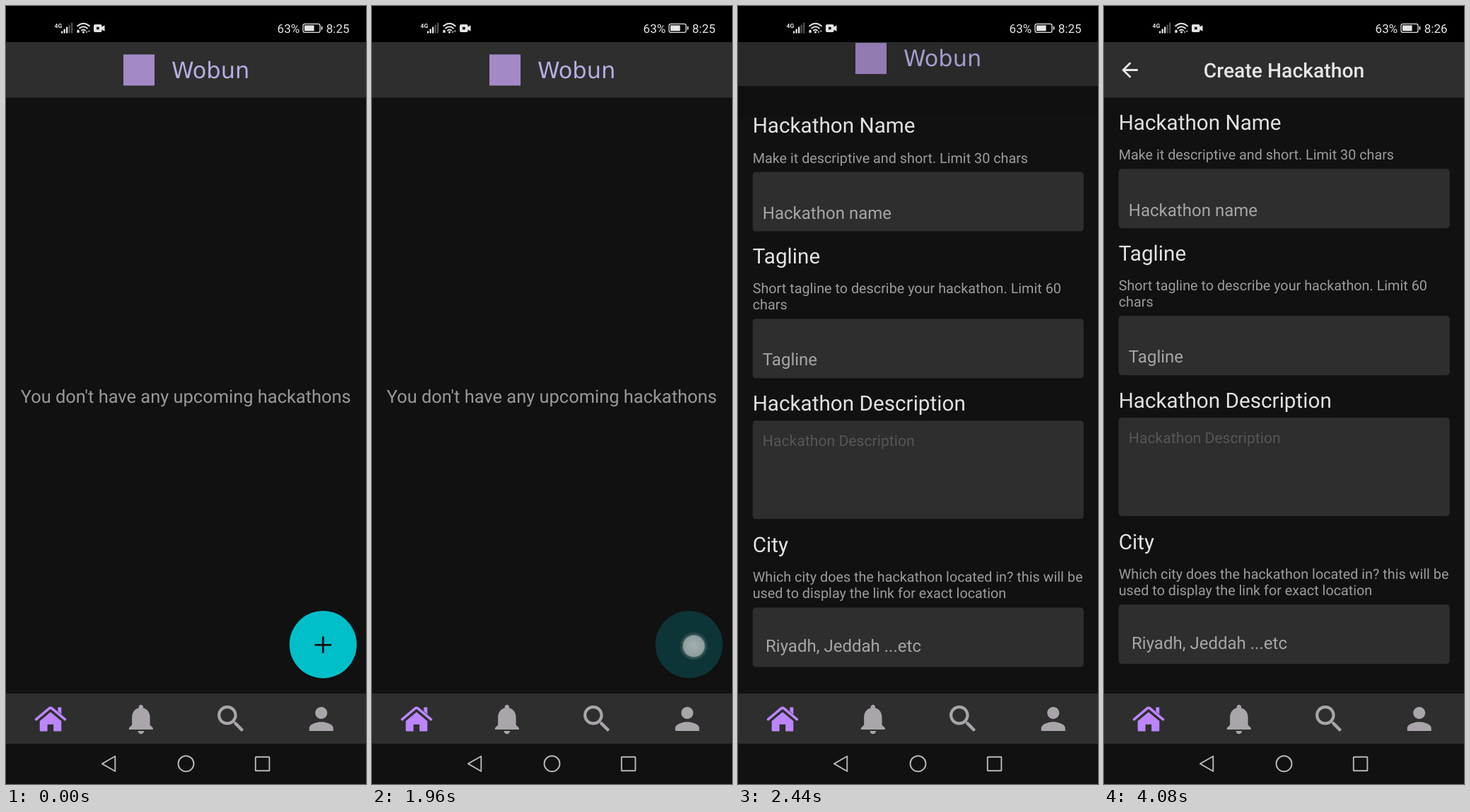
Recreate the animation shown at these times as an HTML page. Size 509 by 1100 pixels, loop 4160 ms.

```html
<!DOCTYPE html>
<html lang="en">
<head>
<meta charset="utf-8">
<title>Create hackathon</title>
<style>
  html, body { margin: 0; width: 100%; height: 100%; overflow: hidden; background: #000; }
  #stage { display: block; width: 509px; height: 1100px; }
  text { font-family: Roboto, sans-serif; text-rendering: geometricPrecision; }
  .bar, .box { fill: #2e2e2e; }
  .page { fill: #111; }
  .label { font-size: 29.69px; fill: #e2e2e2; }
  .hint { font-size: 19.8px; fill: #9c9c9c; }
  .ph { font-size: 24.04px; fill: #a6a6a6; }
  .faint { font-size: 21.2px; fill: #565656; }
  .title { font-size: 28.28px; font-weight: 500; fill: #e6e6e6; text-anchor: middle; }
  .empty { font-size: 25.45px; fill: #999; }
  .brand { font: 32px "DejaVu Sans", sans-serif; fill: #b5aee2; }
  .status { font-size: 17px; fill: #e4e4e4; }
  .tab { fill: #a9a5ab; }
  .nav { fill: none; stroke: #b8b8b8; stroke-width: 1.9; stroke-linejoin: round; }
</style>
</head>
<body>
<svg id="stage" viewBox="0 0 509 1100">
  <defs>
    <radialGradient id="glow">
      <stop offset="0" stop-color="#a3afaf"/>
      <stop offset=".6" stop-color="#93a1a1"/>
      <stop offset=".72" stop-color="#8d9c9c"/>
      <stop offset=".78" stop-color="#8d9c9c" stop-opacity=".35"/>
      <stop offset="1" stop-color="#8d9c9c" stop-opacity="0"/>
    </radialGradient>
  </defs>
  <rect width="509" height="1100"/>

  <!-- stack of screens, clipped between status bar and tabs -->
  <svg y="51" width="509" height="921" viewBox="0 51 509 921">
    <rect class="page" y="51" width="509" height="921"/>
    <g id="home">
      <rect class="page" y="51" width="509" height="960"/>
      <rect class="bar" y="51" width="509" height="78.5"/>
      <rect x="166" y="68.5" width="44" height="44" fill="#a389c6"/>
      <text class="brand" x="234" y="101.5">Wobun</text>
      <text class="empty" x="20.7" y="561">You don't have any upcoming hackathons</text>
      <g id="fab">
        <circle cx="448.3" cy="904.5" r="48" fill="#090909"/>
        <circle cx="448.3" cy="902.8" r="47.6" fill="#00bfc9"/>
        <path d="M436.5 903.3h23.6M448.3 891.5v23.6" stroke="#111" stroke-width="2.8"/>
      </g>
    </g>
    <rect id="shade" y="51" width="509" height="921"/>
    <svg id="reveal" y="51" width="509" height="921" viewBox="0 51 509 921">
      <g id="card">
        <rect class="page" y="51" width="509" height="921"/>
        <g id="form"></g>
        <rect class="bar" y="51" width="509" height="78.5"/>
        <path transform="translate(19.5 73.5) scale(1.414)" fill="#e6e6e6" d="M20 11H7.83l5.59-5.59L12 4l-8 8 8 8 1.41-1.41L7.83 13H20v-2z"/>
        <text class="title" x="254.5" y="101">Create Hackathon</text>
      </g>
    </svg>
  </svg>

  <!-- status bar -->
  <g fill="#e4e4e4">
    <text x="68.5" y="30.5" style="font-size:8.5px;font-weight:700">4G</text>
    <g id="signal"></g>
    <g fill="none" stroke="#e4e4e4" stroke-width="1.9">
      <path d="M100.5 28.8Q109.5 20.5 118.5 28.8M103.5 32Q109.5 26.5 115.5 32M106.3 35Q109.5 32 112.7 35"/>
    </g>
    <circle cx="109.5" cy="37" r="1.6"/>
    <path d="M100.3 37.8v-3l1.7-1.6 1.7 1.6v3zM114 38.3l-1.4-2.2h2.8zM117.3 34l1.4 2.2h-2.8z"/>
    <path fill-rule="evenodd" d="M126 26h7.5q2 0 2 2v1.5l4-2.3v8.6l-4-2.3V35q0 2-2 2H126q-2 0-2-2v-7q0-2 2-2zM128 29.7v3.6h3.6v-3.6z"/>
    <rect x="420" y="25.3" width="24" height="12" rx="2.4" fill="none" stroke="#e4e4e4" stroke-width="1.3"/>
    <rect x="422" y="27.3" width="13.6" height="8"/>
    <rect x="445.6" y="28.8" width="1.8" height="5" rx=".8"/>
  </g>
  <text class="status" x="383.6" y="37.5">63%</text>
  <text class="status" x="452.8" y="37.5" id="clock">8:25</text>

  <!-- tabs -->
  <rect class="bar" y="972" width="509" height="71"/>
  <g fill="#bb86fc">
    <path d="M73.3 991.5h5v10l-5-4.5z"/>
    <path d="M63 998.3l15.3 12.6v13.3q0 1.3-1.3 1.3h-9.8v-9.8h-8.6v9.8H49q-1.3 0-1.3-1.3v-13.3z"/>
    <path d="M42.6 1008.6L61 993.2q2-1.6 4 0l18.4 15.4" fill="none" stroke="#bb86fc" stroke-width="3.7" stroke-linecap="round"/>
  </g>
  <g class="tab">
    <path transform="translate(165.4 982.6) scale(2.121)" d="M12 22c1.1 0 2-.9 2-2h-4c0 1.1.89 2 2 2zm6-6v-5c0-3.07-1.64-5.64-4.5-6.32V4c0-.83-.67-1.5-1.5-1.5s-1.5.67-1.5 1.5v.68C7.63 5.36 6 7.92 6 11v5l-2 2v1h16v-1l-2-2z"/>
    <path transform="translate(292.7 982.6) scale(2.121)" d="M15.5 14h-.79l-.28-.27C15.41 12.59 16 11.11 16 9.5 16 5.91 13.09 3 9.5 3S3 5.91 3 9.5 5.91 16 9.5 16c1.61 0 3.09-.59 4.23-1.57l.27.28v.79l5 4.99L20.49 19l-4.99-5zm-6 0C7.01 14 5 11.99 5 9.5S7.01 5 9.5 5 14 7.01 14 9.5 11.99 14 9.5 14z"/>
    <path transform="translate(420.3 982.6) scale(2.121)" d="M12 12c2.21 0 4-1.79 4-4s-1.79-4-4-4-4 1.79-4 4 1.79 4 4 4zm0 2c-2.67 0-8 1.34-8 4v2h16v-2c0-2.66-5.33-4-8-4z"/>
  </g>

  <!-- system navigation -->
  <rect class="page" y="1043" width="509" height="57"/>
  <g class="nav">
    <path d="M154.3 1060.8v21.2l-18.4-10.6z"/>
    <circle cx="254.5" cy="1071.3" r="11"/>
    <rect x="352.8" y="1061.7" width="19.6" height="19.6" rx=".6"/>
  </g>

  <circle id="touch" cx="455" cy="905" r="20.5" fill="url(#glow)"/>
</svg>

<script>
const $ = id => document.getElementById(id);
const LOOP = 4160, STEP = 40, HEIGHT = 921, TOP = 51;

const text = (cls, x, y, s) => `<text class="${cls}" x="${x}" y="${y}">${s}</text>`;
const box = (y, h) => `<rect class="box" x="20.7" y="${y}" width="468" height="${h}" rx="4.5"/>`;
const LEFT = 20.7, INNER = 34.8;

$("form").innerHTML = [
  text("label", LEFT, 175, "Hackathon Name"),
  text("hint", LEFT, 217.3, "Make it descriptive and short. Limit 30 chars"),
  box(230.3, 84),
  text("ph", INNER, 296.5, "Hackathon name"),
  text("label", LEFT, 360, "Tagline"),
  text("hint", LEFT, 402, "Short tagline to describe your hackathon. Limit 60"),
  text("hint", LEFT, 425, "chars"),
  box(438, 84),
  text("ph", INNER, 504.2, "Tagline"),
  text("label", LEFT, 567.5, "Hackathon Description"),
  box(582, 139),
  text("faint", INNER, 618, "Hackathon Description"),
  text("label", LEFT, 768, "City"),
  text("hint", LEFT, 810, "Which city does the hackathon located in? this will be"),
  text("hint", LEFT, 833, "used to display the link for exact location"),
  box(846.3, 84),
  text("ph", 39, 908.7, "Riyadh, Jeddah ...etc")
].join("");

$("signal").innerHTML = [0, 1, 2, 3, 4].map(i => {
  const h = 3 + i * 3;
  return `<rect x="${78 + i * 3.5}" y="${38.5 - h}" width="2.3" height="${h}" opacity="${i < 3 ? 1 : 0.35}"/>`;
}).join("");

const clamp = v => Math.min(1, Math.max(0, v));
const part = (t, start, length) => clamp((t - start) / length);
const inOut = v => v < 0.5 ? 2 * v * v : 1 - 2 * (1 - v) ** 2;

function bezier(x1, y1, x2, y2) {
  const at = (s, a, b) => 3 * (1 - s) ** 2 * s * a + 3 * (1 - s) * s * s * b + s ** 3;
  return x => {
    if (x <= 0 || x >= 1) return clamp(x);
    let lo = 0, hi = 1;
    for (let i = 0; i < 30; i++) {
      const mid = (lo + hi) / 2;
      if (at(mid, x1, x2) < x) lo = mid; else hi = mid;
    }
    return at(lo, y1, y2);
  };
}
const revealEase = bezier(0.20833, 0.82, 0.25, 1);

const shift = (id, y) => $(id).setAttribute("transform", `translate(0 ${y.toFixed(2)})`);

function draw(t) {
  // press dims the button, release restores it
  const press = inOut(part(t, 1580, 140)) - inOut(part(t, 1980, 250));
  $("fab").setAttribute("opacity", 1 - 0.8 * press);
  $("touch").setAttribute("visibility", t >= 1600 && t < 2000 ? "visible" : "hidden");

  // the new screen is uncovered from below while the old one drifts up
  const p = revealEase(part(t, 2284, 400));
  const drop = (1 - p) * HEIGHT;
  $("reveal").setAttribute("y", TOP + drop);
  shift("card", -0.959 * drop);
  shift("home", -0.02 * HEIGHT * p);
  $("shade").setAttribute("opacity", 0.1 * clamp(p / 0.36));

  $("clock").textContent = t < 3240 ? "8:25" : "8:26";
}

const start = performance.now();
function tick() {
  const t = (performance.now() - start) % LOOP;
  draw(Math.floor(t / STEP) * STEP);
  requestAnimationFrame(tick);
}
tick();
</script>
</body>
</html>
```
